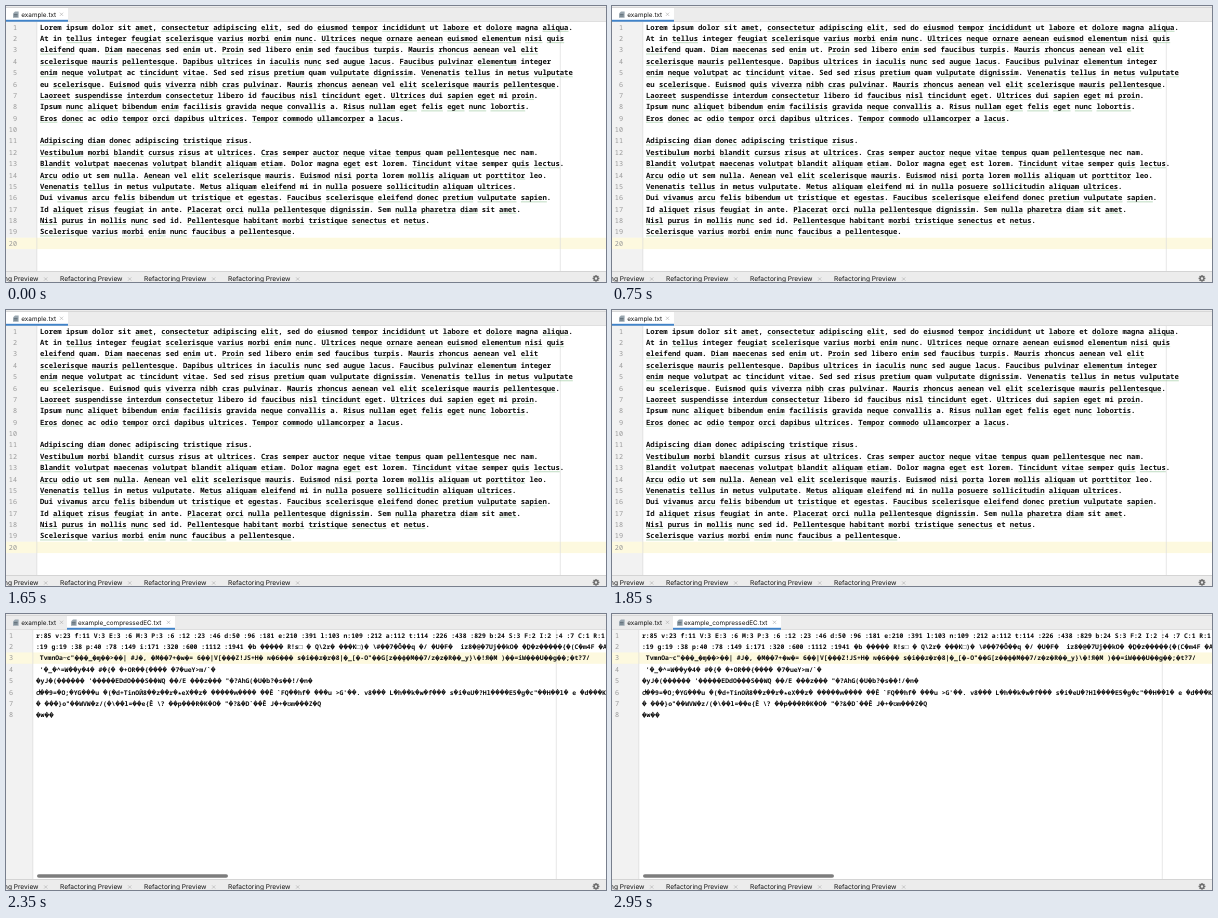
An HTML page that plays this animation: 600x276 px, repeating every 3000 ms.

```html
<!DOCTYPE html>
<html lang="en">
<head>
<meta charset="utf-8">
<title>Editor tabs</title>
<style>
  html, body { margin: 0; width: 100%; height: 100%; overflow: hidden; background: #fff; }
  svg { display: block; width: 600px; height: 276px; }
  text { white-space: pre; text-rendering: geometricPrecision; }
  .code { font-family: "Noto Sans Mono", "DejaVu Sans Mono", monospace; font-weight: 600; fill: #0a0a0a; }
  .num { font-family: "Noto Sans Mono", monospace; font-size: 6.8px; fill: #999; text-anchor: end; }
  .ui { font-family: Inter, Roboto, sans-serif; fill: #111; }
</style>
</head>
<body>
<svg id="stage" viewBox="0 0 600 276" xmlns="http://www.w3.org/2000/svg"></svg>
<script>
const LOOP = 3000, SWITCH_AT = 2000, POINTER_GONE = 2250;
const ROW = 11.37, TOP = 15.7, BASE = 8;
const COLUMNS = 120, COLUMN = 4.332;
const PROSE_SIZE = 7.22, PACKED_SIZE = 6.42;
const ADVANCE = 0.6, UNKNOWN_ADVANCE = 0.72;

const prose = `Lorem ipsum dolor sit amet, consectetur adipiscing elit, sed do eiusmod tempor incididunt ut labore et dolore magna aliqua.
At in tellus integer feugiat scelerisque varius morbi enim nunc. Ultrices neque ornare aenean euismod elementum nisi quis
eleifend quam. Diam maecenas sed enim ut. Proin sed libero enim sed faucibus turpis. Mauris rhoncus aenean vel elit
scelerisque mauris pellentesque. Dapibus ultrices in iaculis nunc sed augue lacus. Faucibus pulvinar elementum integer
enim neque volutpat ac tincidunt vitae. Sed sed risus pretium quam vulputate dignissim. Venenatis tellus in metus vulputate
eu scelerisque. Euismod quis viverra nibh cras pulvinar. Mauris rhoncus aenean vel elit scelerisque mauris pellentesque.
Laoreet suspendisse interdum consectetur libero id faucibus nisl tincidunt eget. Ultrices dui sapien eget mi proin.
Ipsum nunc aliquet bibendum enim facilisis gravida neque convallis a. Risus nullam eget felis eget nunc lobortis.
Eros donec ac odio tempor orci dapibus ultrices. Tempor commodo ullamcorper a lacus.

Adipiscing diam donec adipiscing tristique risus.
Vestibulum morbi blandit cursus risus at ultrices. Cras semper auctor neque vitae tempus quam pellentesque nec nam.
Blandit volutpat maecenas volutpat blandit aliquam etiam. Dolor magna eget est lorem. Tincidunt vitae semper quis lectus.
Arcu odio ut sem nulla. Aenean vel elit scelerisque mauris. Euismod nisi porta lorem mollis aliquam ut porttitor leo.
Venenatis tellus in metus vulputate. Metus aliquam eleifend mi in nulla posuere sollicitudin aliquam ultrices.
Dui vivamus arcu felis bibendum ut tristique et egestas. Faucibus scelerisque eleifend donec pretium vulputate sapien.
Id aliquet risus feugiat in ante. Placerat orci nulla pellentesque dignissim. Sem nulla pharetra diam sit amet.
Nisl purus in mollis nunc sed id. Pellentesque habitant morbi tristique senectus et netus.
Scelerisque varius morbi enim nunc faucibus a pellentesque.
`.split("\n");

const packed = String.raw`r:85 v:23 f:11 V:3 E:3 :6 M:3 P:3 :6 :12 :23 :46 d:50 :96 :181 e:210 :391 l:103 n:109 :212 a:112 t:114 :226 :438 :829 b:24 S:3 F:2 I:2 :4 :7 C:1 R:1
:19 g:19 :38 p:40 :78 :149 i:171 :320 :600 :1112 :1941 �b ����� R!s□ � Q\2r� ���K□)� \#��7�Ô��q �/ �U�F�  iz8�@�7Uj��kO� �Ḏ�z�����{�(C�m4F �A�� �
 TvmnOa~c"���_�ɱ��>��| #J�, �M��7+�w�= 6��|V[���Z!JS+H� ɴ�6��� s�i��ɹ�r�8|�_[�-O"��G[z��ф�M��7/z�z�R��_y}\�!Я�M )��=iW���U��g��;�t?7/
 '�_�^=W��y�4� #�{� �+OR��{���� �7�ueY>m/${"`"}�
�yJ�(������ '�����EDdO���S��WQ ��/E ���z��� "�?AhG(�U�b?�s��!/�n�
Ⴛ��9=�O;�YG���u �(�d+TinOЍ8��z��r�★eX��z� �����ʍ���� ��Ê ${"`"}FQ��hf� ���u >G'��. v8��� L�h��k�w�f��� s�i�eU�?Hl����E5�g�c"��H��l� e �d���K�
� ���}o"��WVW�z/(�\��l=��e{Ê \? ��p���R�K�O� "�?&�D${"`"}��Ê J�+�ʊm���Z�Q
�w��`.split("\n");

const known = new Set(["lorem", "ipsum", "dolor", "integer", "magna", "quam", "ante", "libero", "semper"]);
const stage = document.getElementById("stage");

function add(parent, tag, attrs, content) {
  const node = document.createElementNS(stage.namespaceURI, tag);
  for (const key in attrs) node.setAttribute(key, attrs[key]);
  if (content !== undefined) node.textContent = content;
  return parent.appendChild(node);
}
const rect = (g, x, y, width, height, fill, rx = 0) =>
  add(g, "rect", { x, y, width, height, fill, rx });
const stroke = (g, d, color, width, extra = {}) =>
  add(g, "path", { d, stroke: color, "stroke-width": width, fill: "none", ...extra });
const label = (g, x, y, content, size) =>
  add(g, "text", { x, y, class: "ui", "font-size": size }, content);
const cross = (g, x, y) =>
  stroke(g, `M${x - 1.6} ${y - 1.6}l3.2 3.2m0 -3.2l-3.2 3.2`, "#a8a8a8", 0.6);

function fileIcon(g, x) {
  add(g, "path", { d: `M${x + 2} 5.4h3.6v6.4h-5.6v-4.4z`, fill: "#9aa7b0" });
  stroke(g, `M${x + 1} 8.4h3.6m-3.6 1.6h3.6`, "#4c5a63", 0.7);
}

function tab(g, left, right, name, active) {
  if (active) {
    rect(g, left, 2, right - left, 13, "#fff");
    rect(g, left, 13.8, right - left, 1.9, "#4083c9");
  }
  fileIcon(g, left ? left + 4 : 7);
  label(g, left ? left + 11 : 15.3, 10.8, name, 6.35);
  cross(g, right - 6.5, 8.3);
}

function squiggles(g, line, left, y) {
  for (const { 0: word, index } of line.matchAll(/[A-Za-z]{4,}/g)) {
    if (known.has(word.toLowerCase())) continue;
    stroke(g, `M${left + index * COLUMN} ${y}h${word.length * COLUMN}`,
      "#78b57c", 0.8, { opacity: 0.6 });
  }
}

// The sign for an undecodable byte: a black diamond with a white question mark.
function unknownSign(g, x, y, width) {
  const half = width / 2;
  add(g, "path", { d: `M${x} ${y - 2.5}l${half} -3.1l${half} 3.1l${-half} 3.1z`, fill: "#0a0a0a" });
  stroke(g, `M${x + half - 0.8} ${y - 3.6}q0.8 -0.9 1.6 0q0 0.6 -0.8 1.2v0.5m0 0.4v0.5`, "#fff", 0.5);
}

function codeLine(g, line, x, y, size) {
  for (const run of line.match(/\uFFFD|[^\uFFFD]+/g) || []) {
    if (run === "\uFFFD") {
      unknownSign(g, x, y, size * UNKNOWN_ADVANCE);
      x += size * UNKNOWN_ADVANCE;
    } else {
      add(g, "text", { x, y, class: "code", "font-size": size }, run);
      x += run.length * size * ADVANCE;
    }
  }
}

function editor(lines, gutter, current, size, spelling) {
  const g = add(stage, "g", {});
  const left = gutter + 3;
  rect(g, 0, 16, gutter, 249, "#f2f2f2");
  rect(g, 0, TOP + (current - 1) * ROW, 600, ROW, "#fdf9df");
  rect(g, gutter - 0.4, 16, 0.6, 249, "#d6d6d6");
  rect(g, left + COLUMNS * COLUMN, 16, 0.7, 249, "#dcdcdc");
  lines.forEach((line, i) => {
    const y = TOP + i * ROW + BASE;
    add(g, "text", { x: gutter - 20, y, class: "num" }, i + 1);
    if (spelling) squiggles(g, line, left, y + 1.6);
    codeLine(g, line, left, y, size);
  });
  rect(g, 0, 0, 600, 15.5, "#ececec");
  rect(g, 0, 1, 600, 0.8, "#d3d3d3");
  rect(g, 0, 15.2, 600, 0.6, "#d1d1d1");
  return g;
}

function gear(x, y) {
  for (let i = 0; i < 8; i++)
    add(stage, "rect", { x: x - 0.7, y: y - 3.4, width: 1.4, height: 1.8, fill: "#6e6e6e",
      transform: `rotate(${i * 45} ${x} ${y})` });
  add(stage, "circle", { cx: x, cy: y, r: 1.9, fill: "none", stroke: "#6e6e6e", "stroke-width": 1.3 });
}

function toolBar() {
  rect(stage, 0, 265, 600, 11, "#ececec");
  rect(stage, 0, 265, 600, 0.8, "#cfcfcf");
  for (let i = 0; i < 4; i++) {
    const x = -30 + i * 84;
    label(stage, x, 275, "Refactoring Preview", 6.6);
    cross(stage, x + 69.7, 273);
  }
  gear(590, 272.4);
}

const textView = editor(prose, 31, 20, PROSE_SIZE, true);
tab(textView, 0, 62, "example.txt", true);

const packedView = editor(packed, 27, 3, PACKED_SIZE, false);
tab(packedView, 0, 62, "example.txt", false);
tab(packedView, 61, 169, "example_compressedEC.txt", true);
rect(packedView, 31, 260.2, 191, 3.6, "#7d7d7d", 1.8);
const pointer = stroke(packedView, "M55.8 40h3.2m-1.6 0v8m-1.6 0h3.2", "#222", 0.8);

toolBar();

const show = (node, visible) => node.setAttribute("visibility", visible ? "inherit" : "hidden");

function frame(now) {
  const t = now % LOOP;
  show(textView, t < SWITCH_AT);
  show(packedView, t >= SWITCH_AT);
  show(pointer, t < POINTER_GONE);
  requestAnimationFrame(frame);
}
frame(0);
</script>
</body>
</html>
```
